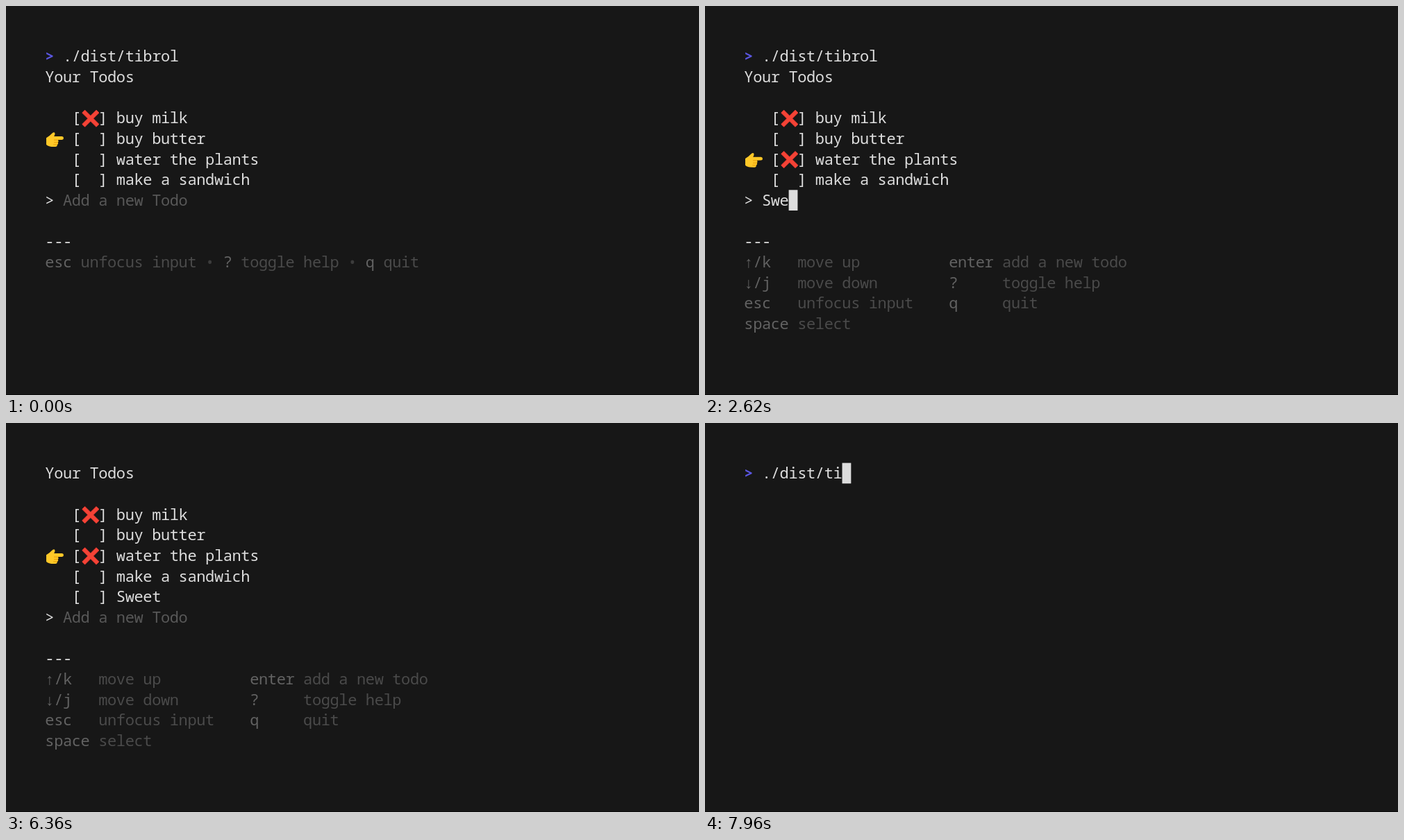
An HTML page with a canvas for the animation above (8 s loop, 998 by 561 pixels).

```html
<!DOCTYPE html>
<html lang="en">
<head>
<meta charset="utf-8">
<title>Todo terminal</title>
<style>
  html, body { margin: 0; width: 100%; height: 100%; overflow: hidden; background: #171717; }
  canvas { display: block; }
</style>
</head>
<body>
<canvas id="stage" width="998" height="561"></canvas>
<script>
const ctx = document.getElementById('stage').getContext('2d');
const LOOP = 8000;
const LEFT = 56.5, TOP = 57.6, CELL = 12.82, LINE = 29.67, BASE = 22.8;
const BG = '#171717', FG = '#dddddd', PROMPT = '#5a56e0', HINT = '#585858';
const KEY = '#626262', DESC = '#4a4a4a', DOT = '#3c3c3c';
const COMMAND = './dist/tibrol', ENTRY = 'Sweet', PLACEHOLDER = 'Add a new Todo';
const TODOS = ['buy milk', 'buy butter', 'water the plants', 'make a sandwich'];

const TYPE_TIMES = [2560, 2580, 2620, 2680, 2720];
const COMMAND_TIMES = [7560, 7620, 7660, 7720, 7760, 7820, 7860, 7920, 7960];
const BLINK_TIMES = [3200, 3620, 4100, 4560, 5000, 5460, 5920, 6360, 6840, 7260];

const passed = (times, t) => times.filter(x => x <= t).length;
const cellX = col => LEFT + col * CELL;
const rowY = row => TOP + row * LINE;

// Monospaced grid: one glyph per cell.
function text(str, col, row, color = FG, weight = 400) {
  ctx.font = `${weight} 22px "Noto Sans Mono", "DejaVu Sans Mono", monospace`;
  ctx.textAlign = 'center';
  ctx.fillStyle = color;
  [...str].forEach((ch, i) => {
    if (ch !== ' ') ctx.fillText(ch, cellX(col + i + 0.5), rowY(row) + BASE);
  });
}

function cursor(col, row, under = '') {
  ctx.fillStyle = FG;
  ctx.fillRect(cellX(col), rowY(row), CELL, LINE);
  text(under, col, row, BG);
}

function cross(row) {
  ctx.save();
  ctx.translate(121.8, rowY(row) + 15.6);
  ctx.lineCap = 'butt';
  for (const [width, color] of [[6.4, '#c92f2a'], [5.2, '#f44336']]) {
    ctx.lineWidth = width;
    ctx.strokeStyle = color;
    ctx.beginPath();
    ctx.moveTo(-10.3, -10.3);
    ctx.lineTo(10.3, 10.3);
    ctx.moveTo(10.3, -10.3);
    ctx.lineTo(-10.3, 10.3);
    ctx.stroke();
  }
  ctx.restore();
}

function hand(row) {
  ctx.save();
  ctx.translate(58, rowY(row) + 5);
  ctx.fillStyle = '#ffc828';
  ctx.beginPath();
  ctx.moveTo(0, 9);
  ctx.quadraticCurveTo(5, 6, 8.5, 2.2);
  ctx.quadraticCurveTo(11, 0, 12.3, 1.6);
  ctx.quadraticCurveTo(13.2, 3.5, 11.2, 6.8);
  ctx.lineTo(22.6, 6.8);
  ctx.quadraticCurveTo(25, 7, 25, 9.2);
  ctx.quadraticCurveTo(25, 11.4, 22.6, 11.6);
  ctx.lineTo(16.6, 11.8);
  ctx.quadraticCurveTo(18.6, 13.8, 16.7, 15.4);
  ctx.quadraticCurveTo(18, 17.4, 15.8, 18.7);
  ctx.quadraticCurveTo(16, 21.6, 13, 21.8);
  ctx.lineTo(7.5, 21.6);
  ctx.quadraticCurveTo(2, 21, 0, 18.5);
  ctx.closePath();
  ctx.fill();
  ctx.strokeStyle = '#e59600';
  ctx.lineWidth = 0.9;
  ctx.beginPath();
  for (const [x, y] of [[16.5, 11.9], [16.6, 15.4], [15.7, 18.7]]) {
    ctx.moveTo(x, y);
    ctx.lineTo(x - 5.5, y);
  }
  ctx.stroke();
  ctx.restore();
}

function pairs(items, row) {
  for (const [col, str, color] of items) text(str, col, row, color);
}

function shortHelp() {
  pairs([
    [0, 'esc', KEY], [4, 'unfocus input', DESC], [18, '•', DOT],
    [20, '?', KEY], [22, 'toggle help', DESC], [34, '•', DOT],
    [36, 'q', KEY], [38, 'quit', DESC]
  ], 10);
}

function fullHelp() {
  [
    ['↑/k', 'move up', 'enter', 'add a new todo'],
    ['↓/j', 'move down', '?', 'toggle help'],
    ['esc', 'unfocus input', 'q', 'quit'],
    ['space', 'select', '', '']
  ].forEach(([a, b, c, d], i) => {
    pairs([[0, a, KEY], [6, b, DESC], [23, c, KEY], [29, d, DESC]], 10 + i);
  });
}

function prompt(str) {
  text('>', 0, 0, PROMPT, 600);
  text(str, 2, 0);
}

function todoList(t) {
  const added = t >= 3180;
  const title = added ? 0 : 1;
  const first = title + 2;
  const items = added ? [...TODOS, ENTRY] : TODOS;
  const selected = t < 240 ? 1 : 2;
  if (!added) prompt(COMMAND);
  text('Your Todos', 0, title);
  items.forEach((item, i) => {
    const row = first + i;
    text('[', 3, row);
    text(']', 6, row);
    text(item, 8, row);
    if (i === 0 || (i === 2 && t >= 760)) cross(row);
    if (i === selected) hand(row);
  });
}

function input(t) {
  text('>', 0, 7);
  const typed = t < 3180 ? passed(TYPE_TIMES, t) : 0;
  if (typed) {
    text(ENTRY.slice(0, typed), 2, 7);
    cursor(2 + typed, 7);
    return;
  }
  text(PLACEHOLDER, 2, 7, HINT);
  const focused = t >= 2540 && t < 3180;
  if (focused || passed(BLINK_TIMES, t) % 2) cursor(2, 7, PLACEHOLDER[0]);
}

function draw(t) {
  ctx.fillStyle = BG;
  ctx.fillRect(0, 0, 998, 561);
  ctx.fillStyle = '#0b0b0b';
  ctx.fillRect(0, 560, 998, 1);
  const typed = passed(COMMAND_TIMES, t);
  if (typed) {
    prompt(COMMAND.slice(0, typed));
    cursor(2 + typed, 0);
    return;
  }
  todoList(t);
  input(t);
  text('---', 0, 9);
  if (t < 1680) shortHelp();
  else fullHelp();
}

const start = performance.now();
function tick() {
  draw((performance.now() - start) % LOOP);
  requestAnimationFrame(tick);
}
tick();
</script>
</body>
</html>
```
